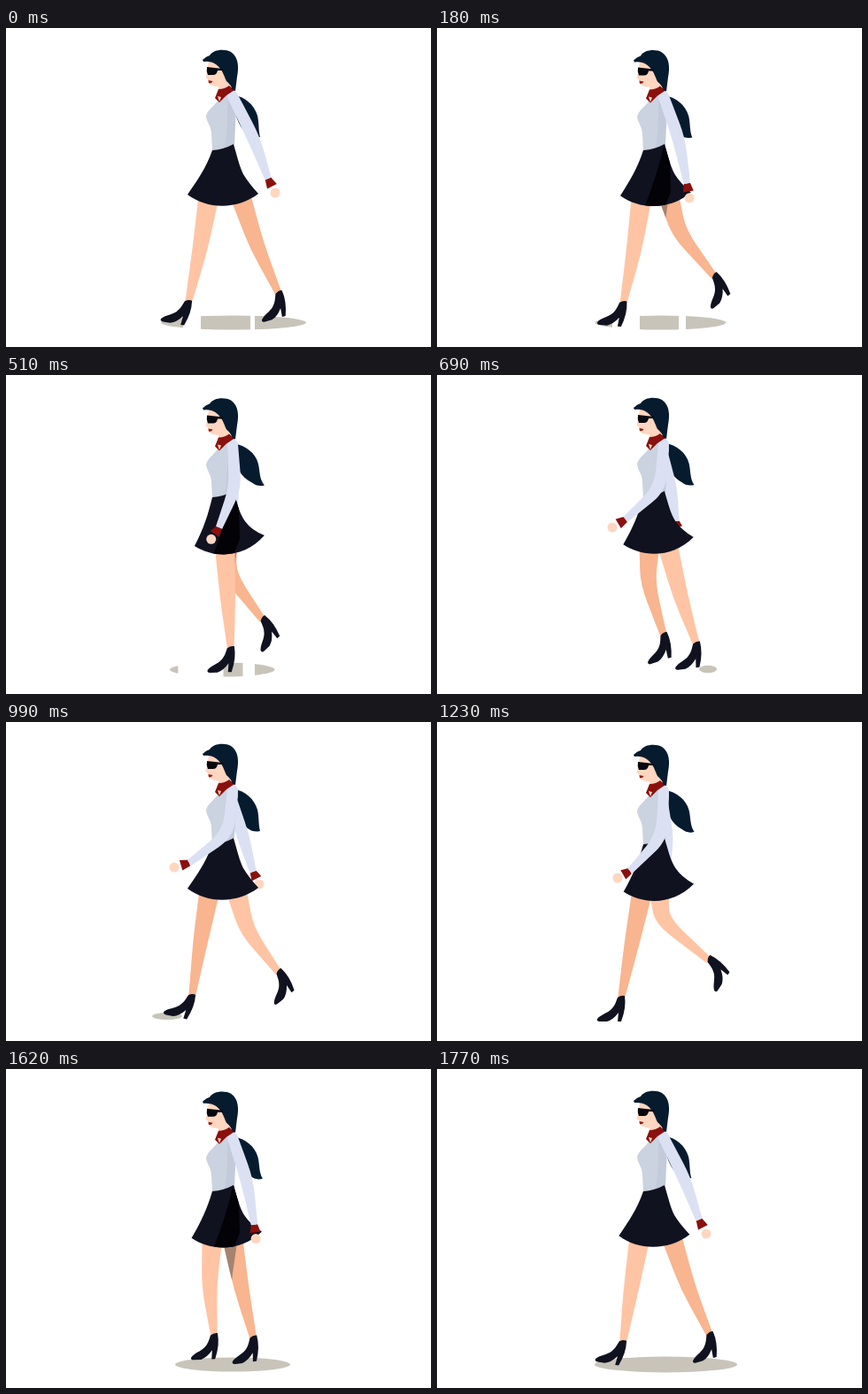
An HTML page with a canvas that plays this animation: 480x360 px, repeating every 1800 ms.

```html
<!DOCTYPE html>
<html lang="en">
<head>
<meta charset="utf-8">
<title>Walk cycle</title>
<style>
  html, body { margin: 0; width: 100%; height: 100%; overflow: hidden; background: #fff; }
  canvas { display: block; width: 480px; height: 360px; }
</style>
</head>
<body>
<canvas id="stage" width="480" height="360"></canvas>
<script>
const ctx = document.getElementById('stage').getContext('2d');
const LOOP = 1800, STEP = 30;

const NAVY = '#071b2f', BLACK = '#10121f', RED = '#8a100d';
const SLEEVE = '#dbe1f3', SHIRT = '#cbd2e0', FACE = '#ffd6c0';
const NEAR_SKIN = '#ffc4a4', FAR_SKIN = '#f8b58f', GROUND = '#c8c4ba';

// Rows: time, hip x, knee x, knee y, ankle x, ankle y, foot angle
const nearLeg = [
  [0, 229, 219, 250, 206, 308, 10],
  [360, 236, 230, 255, 223, 309, 0],
  [690, 260, 275, 250, 293, 302, -7],
  [990, 260, 272, 235, 308, 281, -39],
  [1230, 251, 254, 224, 307, 267, -57],
  [1470, 238, 240, 240, 261, 290, -18],
  [1770, 229, 219, 250, 210, 307, 10]
];
const farLeg = [
  [0, 265, 283, 245, 308, 298, -16],
  [360, 257, 263, 222, 311, 266, -56],
  [690, 240, 238, 235, 256, 292, -18],
  [990, 230, 220, 245, 210, 308, 12],
  [1230, 232, 220, 250, 208, 310, 0],
  [1470, 246, 248, 250, 250, 306, 0],
  [1770, 265, 283, 245, 308, 298, -16]
];
// Rows: time, elbow x, y, wrist x, y, hand x, y
const nearArm = [
  [0, 280, 125, 296, 170, 304, 186],
  [360, 266, 126, 265, 178, 262, 194],
  [690, 252, 128, 213, 163, 198, 172],
  [990, 251, 126, 207, 159, 190, 164],
  [1230, 254, 130, 218, 168, 204, 176],
  [1470, 264, 126, 262, 179, 257, 194],
  [1770, 280, 125, 296, 170, 304, 186]
];
const farArm = [
  [0, 245, 118, 243, 160, 243, 175],
  [360, 250, 122, 248, 164, 248, 178],
  [690, 264, 128, 270, 165, 272, 177],
  [990, 268, 130, 279, 169, 286, 183],
  [1230, 260, 130, 260, 165, 260, 178],
  [1470, 250, 122, 248, 164, 248, 178]
];
// Skirt and hair sway, twice per loop
const sway = [[0, 0], [90, 0], [345, .75], [570, 1], [690, .67], [870, .05]];

// Smooth periodic interpolation through the rows
function pose(rows, t, loop = LOOP) {
  const n = rows.length;
  const row = i => {
    const turn = Math.floor(i / n), r = rows[i - turn * n];
    return [r[0] + turn * loop, ...r.slice(1)];
  };
  let i = n - 1;
  while (rows[i][0] > t) i--;
  const [p, a, b, q] = [i - 1, i, i + 1, i + 2].map(row);
  const d = b[0] - a[0], u = (t - a[0]) / d, v = 1 - u;
  return a.slice(1).map((av, k) => {
    const j = k + 1, bv = b[j];
    const ma = (bv - p[j]) / (b[0] - p[0]) * d;
    const mb = (q[j] - av) / (q[0] - a[0]) * d;
    return av * (1 + 2 * u) * v * v + bv * (3 - 2 * u) * u * u + ma * u * v * v - mb * u * u * v;
  });
}

const mix = (a, b, u) => a + (b - a) * u;
const between = (a, b, u) => [mix(a[0], b[0], u), mix(a[1], b[1], u)];

function fill(shape, color) {
  ctx.fillStyle = color;
  ctx.fill(typeof shape === 'string' ? new Path2D(shape) : shape);
}

function oval(x, y, rx, ry = rx) {
  const path = new Path2D();
  path.ellipse(x, y, rx, ry, 0, 0, Math.PI * 2);
  return path;
}

function normal(a, b) {
  const dx = b[0] - a[0], dy = b[1] - a[1], len = Math.hypot(dx, dy) || 1;
  return [-dy / len, dx / len];
}

// Tapered two-part limb with a softly rounded joint
function limb(a, b, c, wa, wb, wc) {
  const n1 = normal(a, b), n2 = normal(b, c);
  const sum = [n1[0] + n2[0], n1[1] + n2[1]], len = Math.hypot(...sum);
  const nb = sum.map(v => v / len);
  const off = (p, n, w) => [p[0] + n[0] * w, p[1] + n[1] * w];
  const path = new Path2D();
  const side = (from, joint, to) => {
    path.lineTo(...from);
    path.lineTo(...between(from, joint, .65));
    path.quadraticCurveTo(...joint, ...between(joint, to, .35));
    path.lineTo(...to);
  };
  side(off(a, n1, wa), off(b, nb, wb), off(c, n2, wc));
  side(off(c, n2, -wc), off(b, nb, -wb), off(a, n1, -wa));
  path.closePath();
  return path;
}

function drawShoe(x, y, angle) {
  ctx.save();
  ctx.translate(x, y);
  ctx.rotate(angle * Math.PI / 180);
  fill('M-4 1 C-6 6 -7 10 -11 14 C-16 19 -23 20 -27 25 Q-28 28 -24 28 L-16 28 ' +
       'Q-9 26 -3 18 L-4 28 L0 28 Q3 20 4 13 Q5 6 4 -1 Q0 -2 -4 1Z', BLACK);
  ctx.restore();
}

function drawLeg([hip, kx, ky, ax, ay, angle], color, shaded) {
  const path = limb([hip, 190], [kx, ky], [ax, ay + 2], 11.5, 8.5, 3.8);
  fill(path, color);
  if (shaded) {
    ctx.save();
    ctx.clip(path);
    fill('M244 196 H261 L256 230 L254 250 L245 225Z', '#a5836f');
    ctx.restore();
  }
  drawShoe(ax, ay, angle);
}

function drawArm([ex, ey, wx, wy, hx, hy], shoulder) {
  const wrist = [wx, wy], hand = [hx, hy], cuff = between(wrist, hand, .55);
  fill(oval(hx, hy, 5.5), FACE);
  fill(limb(wrist, between(wrist, cuff, .5), cuff, 3.6, 4.8, 6), RED);
  fill(oval(...shoulder, 6), SLEEVE);
  fill(limb(shoulder, [ex, ey], wrist, 6, 7.2, 3.8), SLEEVE);
}

function drawGround(t) {
  if (t < 540) {
    const u = t / 360, l = mix(175, 182, u), r = mix(339, 314, u);
    const bands = [[l, 200 - 4 * u], [220 + 18 * u, 276 - 6 * u], [281, r]];
    ctx.save();
    const gaps = new Path2D();
    bands.forEach(([x0, x1]) => gaps.rect(x0, 320, x1 - x0, 30));
    ctx.clip(gaps);
    fill(oval((l + r) / 2, 332.5, (r - l) / 2, 8), GROUND);
    ctx.restore();
  } else if (t < 840) {
    fill(oval(306, 332, 10, 4.2), GROUND);
  } else if (t < 1110) {
    fill(oval(182, 332, 17, 4), GROUND);
  } else if (t >= 1380) {
    const u = Math.max(0, (t - 1470) / 300);
    const l = mix(204, 178, u), r = mix(303, 339, u);
    fill(oval((l + r) / 2, 333.5, (r - l) / 2, mix(7, 9, u)), GROUND);
  }
}

function drawSkirt(s, shaded) {
  const lx = 205 + 8 * s, ly = 188 + 5 * s, rx = 285 + 7 * s, ry = 187 - 6 * s;
  const path = new Path2D(
    `M233 138 Q246 137 257 131 C261 145 264 157 ${268 + 2 * s} 165 Q${274 + 3 * s} 175 ${rx} ${ry} ` +
    `C${rx - 22} ${204 + 2 * s} ${lx + 24} ${206 + 2 * s} ${lx} ${ly} C${lx + 11} 172 ${226 + 2 * s} 158 233 138Z`);
  fill(path, BLACK);
  if (shaded) {
    ctx.save();
    ctx.clip(path);
    fill('M257 130 L263 150 L264 185 L256 205 H233 Q247 172 257 130Z', '#020207');
    ctx.restore();
  }
}

function drawHair(s) {
  const tip = 287 + 5 * s;
  fill(`M258 76 C270 78 ${280 + 2 * s} 86 ${284 + s} 99 C${286 + s} 108 ${285 + s} 116 ${tip} 123 ` +
       `Q${tip - 8} 125 ${tip - 14} 120 C264 113 260 101 258 92Z`, NAVY);
}

function drawTorso() {
  fill('M241 78 C239 86 229 90 226 99 C226 106 232 110 232 120 L233 138 ' +
       'Q246 137 258 131 L258 108 L262 84 Q262 72 255 69Z', SHIRT);
  fill('M250 82 L260 90 L258 131 L247 135 Q251 110 250 82Z', '#c3cad9');
}

function drawHead() {
  fill('M229 38 L227 50 L225.5 56 L228 58 L229 63 Q234 67 240 66 L240 78 L252 70 L256 52 L243 38Z', FACE);
  fill('M240 69 Q247 69 252 65 L258 70 L249 76 L241 84 L236 79Z', RED);
  fill('M239 77 L243 78 L241 83Z', FACE);
  fill('M222 36 Q226 32 230 31 C234 24 247 23 254 27 C263 33 263 45 261 55 L259 71 ' +
       'L256 70 Q254 64 249 60 C246 54 245 47 237 41 Q231 37 223 38Z', NAVY);
  fill('M227 44 L245 46 V48 L239 48 Q238 53 234 53 H228 Q226 49 227 44Z', '#08090f');
  fill('M228.5 59 L233.5 60 Q232 63 229 62Z', '#961c18');
}

function draw(t) {
  ctx.fillStyle = '#fff';
  ctx.fillRect(0, 0, 480, 360);
  const [s] = pose(sway, t % 900, 900);
  const arm = pose(nearArm, t);
  const shaded = arm[2] > 240 && arm[2] < 283;
  const bob = 1.5 * s;

  drawGround(t);
  drawLeg(pose(farLeg, t), FAR_SKIN, shaded);
  drawLeg(pose(nearLeg, t), NEAR_SKIN, false);

  ctx.save();
  ctx.translate(0, bob);
  drawHair(s);
  ctx.restore();
  drawArm(pose(farArm, t), [254, 85]);
  ctx.save();
  ctx.translate(0, bob);
  drawTorso();
  ctx.restore();
  drawSkirt(s, shaded);
  drawArm(arm, [256, 77 + bob]);
  ctx.save();
  ctx.translate(0, bob);
  drawHead();
  ctx.restore();
}

function tick() {
  const t = performance.now() % LOOP;
  draw(Math.floor(t / STEP) * STEP);
  requestAnimationFrame(tick);
}
tick();
</script>
</body>
</html>
```
